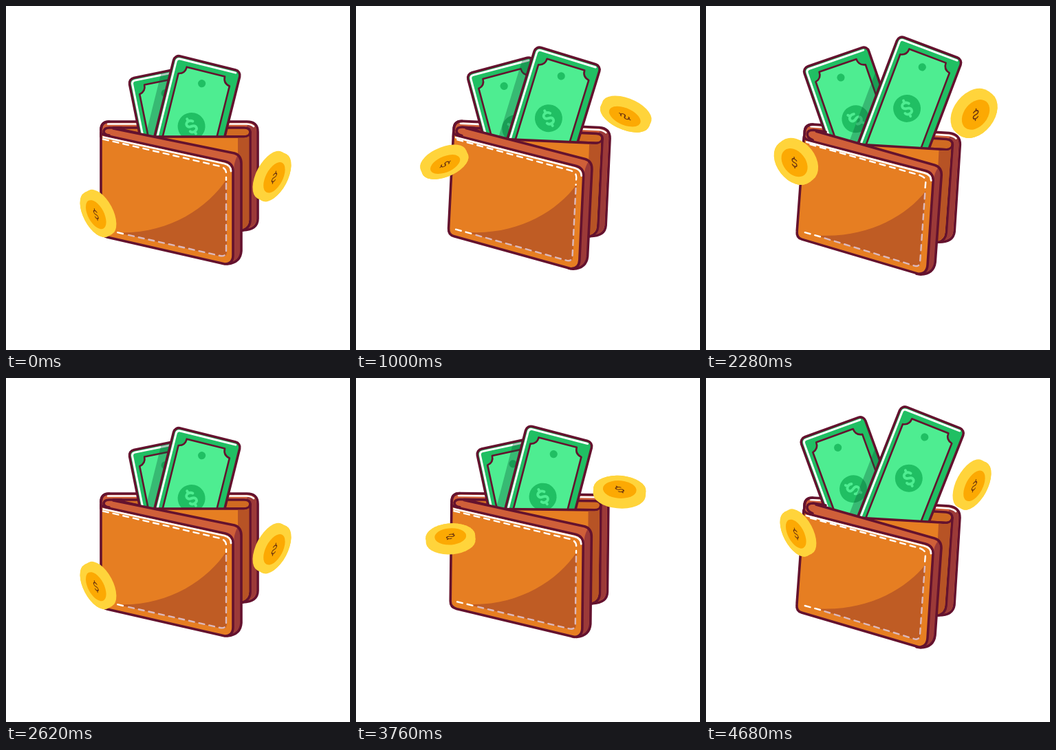
An HTML page that plays this animation: 500 by 500 pixels, repeating every 4800 ms.

```html
<!DOCTYPE html>
<html lang="en">
<head>
<meta charset="utf-8">
<title>Wallet</title>
<style>
html, body { margin: 0; width: 100%; height: 100%; overflow: hidden; background: #fff; }
svg { display: block; width: 100vw; height: 100vh; }
.ink { stroke: #64122e; stroke-width: 3.6; stroke-linejoin: round; stroke-linecap: round; }
.line { fill: none; stroke-linecap: round; }
</style>
</head>
<body>
<svg viewBox="0 0 500 500">
  <defs>
    <path id="dollar" d="M5 -5 Q3 -8 0 -8 C-6.5 -8 -6.5 -1 0 0 C6.5 1 6.5 8 0 8 Q-4 8 -5 5 M0 -11.5 V-8 M0 8 V11.5" fill="none" stroke-linecap="round"/>
    <g id="bill">
      <rect width="99" height="190" rx="8" fill="#20bf63"/>
      <path d="M4 188 V9 Q4 4 9 4 H92" class="line" stroke="#fff" stroke-width="3"/>
      <path class="ink" fill="#4eed91" style="stroke-width:2.6" d="M11.5 188 V25 Q21 23 21 13 H78 Q78 23 88 25 V188"/>
      <circle cx="48" cy="31" r="5.6" fill="#20bf63"/>
      <circle cx="48.5" cy="95" r="20" fill="#20bf63"/>
      <use href="#dollar" transform="translate(48.5 95) rotate(-45) scale(1.08)" stroke="#4eed91" stroke-width="3.6"/>
      <rect class="ink" width="99" height="190" rx="8" fill="none"/>
    </g>
    <clipPath id="backClip"><rect id="backArea" x="1.5" y="1.5" width="96" height="188" rx="7"/></clipPath>
  </defs>
  <g id="behind"></g>
  <use id="backBill" href="#bill"/>
  <g clip-path="url(#backClip)"><rect id="shadow" x="-13" width="14" height="190" fill="#0c5a3a" opacity=".34"/></g>
  <use id="frontBill" href="#bill"/>
  <g id="cover"></g>
  <g id="coins"></g>
</svg>
<script>
const NS = 'http://www.w3.org/2000/svg';
const LOOP = 4800, STARTS = [140, 880, 1520, 2220, 2860, 3600, 4260];
const $ = id => document.getElementById(id);
const lerp = (a, b, p) => a + (b - a) * p;

function add(parent, tag, attrs) {
  const el = document.createElementNS(NS, tag);
  for (const k in attrs) el.setAttribute(k, attrs[k]);
  parent.appendChild(el);
  return el;
}

// Each part: layer, attributes, path when closed, path when open.
const fill = c => ({ fill: c });
const inked = c => ({ fill: c, class: 'ink' });
const line = (c, w, dash) => ({ class: 'line', stroke: c, 'stroke-width': w, 'stroke-dasharray': dash || 'none' });
const RIM = '#cf5f39', RED = '#9c3a38', ORANGE = '#e67e22', SHADE = '#bf5c24';
const parts = [
  ['behind', inked(RIM),
    'M139 186 L138 180 Q138 168 150 168 L350 168 Q366 168 366 183 L366 309 Q366 325 344 326 L300 320 L180 200Z',
    'M143 192 L143 186 Q143 174 155 174 L353 186 Q369 188 369 203 L361 330 Q359 345 338 345 L300 340 L180 214Z'],
  ['behind', fill(RED),
    'M352 171 Q364 172 364 183 L364 309 Q364 320 349 324 Q355 320 355 311 L355 183 Q355 178 349 177Z',
    'M355 189 Q367 191 367 203 L359 330 Q357 341 343 343 Q349 340 349 331 L358 203 Q358 197 352 195Z'],
  ['behind', line('#fff', 2.6),
    'M148 171.5 L350 171.5 Q357 172 360 175', 'M152 177 L353 189.5 Q360 191 363 194'],
  ['behind', inked('#d06a22'),
    'M156 177 L346 177 Q355 177 355 183.5 Q355 190 346 190 L215 190Z',
    'M160 184 L349 195 Q358 196 358 203 Q357 211 349 210.5 L228 203.5Z'],
  ['cover', inked(ORANGE),
    'M215 190 L346 190 Q355 190 355 183 L355 311 Q355 322 344 326 L300 320 L215 240Z',
    'M228 203.5 L349 210.5 Q358 210 358 203 L349 331 Q348 342 338 345 L300 340 L228 250Z'],
  ['cover', fill('#b75325'),
    'M337 191.7 L346 191.7 Q351 191 353.3 189 L353.3 311 Q353 321 344 324 L337 322Z',
    'M338 211.7 L349 212.2 Q354 212 356 209 L347.3 331 Q346 340 338 343 L332 342Z'],
  ['cover', fill(RIM),
    'M138 187 L139 183 Q140 176 150 176 L156 177 L332 214 Q342 217 342 229 L342 356 Q341 373 322 375 L147 336 Q138 334 138 325Z',
    'M142 196 L144 190 Q145 181 155 181 L160 184 L332 233 Q342 236 342 247 L333 374 Q331 391 312 392 L139 341 Q131 339 132 329Z'],
  ['cover', fill(RED),
    'M331 240 Q331 228 336 218 Q342 222 342 229 L342 356 Q341 373 322 375 Q331 372 331 362Z',
    'M331 253 Q331 245 337 237 Q342 241 342 247 L333 374 Q331 391 312 392 Q322 388 322 380Z'],
  ['cover', { class: 'ink', fill: 'none' },
    'M150 188 Q142 187 142 182 Q143 177 150 177 L168 177 M156 178 L332 214 Q342 217 342 229 L342 356 Q341 373 322 375 L315 374',
    'M155 197 Q146 193 147 187 Q148 182 156 182 L174 185 M160 184 L332 233 Q342 236 342 247 L333 374 Q331 391 312 392 L306 391'],
  ['cover', { class: 'ink', fill: 'none' },
    'M138 190 L138 180 Q138 168 150 168', 'M142 199 L143 186 Q143 174 155 174'],
  ['cover', inked(ORANGE),
    'M138 184 Q140 187 146 188.5 L319 226 Q330 229 330 240 L330 362 Q330 375 318 375 L147 336 Q138 334 138 325Z',
    'M142 192 Q144 196 150 198 L319 241 Q330 244 330 255 L322 378 Q321 391 309 391 L139 341 Q131 339 132 329Z'],
  ['cover', line('#fff', 2.8),
    'M141.5 190.5 L317 229 Q327 231.5 327 240', 'M146 200 L317 244 Q327 246.5 327 255'],
  ['cover', fill(SHADE),
    'M160 329 C232 333 292 296 321 251 L321 357 Q321 366 312 364Z',
    'M160 335 C232 340 290 308 319 271 L311 375 Q311 383 302 380Z'],
  ['cover', line('#fff', 2.4, '8 7'),
    'M141 193.5 L311 233 Q320 235.5 320 243 L320 253', 'M152 203.5 L311 247.5 Q319 250 319 257 L318 269'],
  ['cover', line('#dcb9bd', 2.4, '8 7'),
    'M320 258 L320 356 Q320 365 311 363 L172 331.5', 'M318 274 L311 373 Q310 382 302 379 L172 339'],
  ['cover', line('#fff', 2.4, '8 7'),
    'M170 331 L144 325', 'M166 337 L140 330']
].map(([layer, attrs, a, b]) => ({ el: add($(layer), 'path', attrs), a, b: b.match(/[\d.]+/g).map(Number) }));

function mixPath(a, b, p) {
  let i = 0;
  return a.replace(/[\d.]+/g, n => lerp(+n, b[i++], p).toFixed(2));
}

function track(t, keys) {
  for (let i = 1; i < keys.length; i++) {
    const [t0, v0] = keys[i - 1], [t1, v1] = keys[i];
    if (t < t1) return lerp(v0, v1, Math.max(0, (t - t0) / (t1 - t0)));
  }
  return keys[keys.length - 1][1];
}

// Small vector helpers for the tumbling coins
const dot = (a, b) => a[0] * b[0] + a[1] * b[1] + a[2] * b[2];
const cross = (a, b) => [a[1] * b[2] - a[2] * b[1], a[2] * b[0] - a[0] * b[2], a[0] * b[1] - a[1] * b[0]];
const unit = a => a.map(x => x / Math.hypot(...a));
function turn(v, k, ang) {
  const c = Math.cos(ang), s = Math.sin(ang), w = cross(k, v), d = dot(k, v) * (1 - c);
  return v.map((x, i) => x * c + w[i] * s + k[i] * d);
}
const REST = unit([-.76, .4, .5]);
const TILT = [-.2, 1, 0];
const DOWN = unit(TILT.map((x, i) => x - REST[i] * dot(REST, TILT)));
const SIDE = cross(DOWN, REST);

// Motion of both directions: wallet, coin travel, coin spin, coin sway
const OPEN = {
  wallet: [[0, 0], [40, .06], [80, .36], [100, .58], [120, .8], [140, .93], [200, .985], [380, 1]],
  move: [[0, 0], [60, .2], [100, .58], [140, .88], [200, .97], [380, 1]],
  spin: [[0, 0], [60, .2], [100, .55], [140, .83], [220, .95], [390, 1]],
  sway: [[0, 0], [140, 4], [380, 0]],
  axis: unit(cross(REST, [-.91, -.42, 0])), dir: -1
};
const CLOSE = {
  wallet: [[0, 0], [60, .1], [100, .38], [120, .58], [140, .8], [160, .92], [220, .985], [380, 1]],
  move: [[0, 0], [120, .02], [160, .11], [220, .5], [280, .85], [390, 1]],
  spin: [[0, 0], [60, .06], [120, .3], [160, .57], [220, .85], [300, .97], [390, 1]],
  sway: [[0, 0], [120, -6], [160, 3.5], [390, 0]],
  axis: unit([-.33, .93, .14]), dir: 1
};

const R = 36, HALF = 4.2;
function makeCoin(x, yClosed, yOpen, scale, flip) {
  const g = add($('coins'), 'g', {});
  const gold = fill('#ffd43b');
  const faces = [-1, 1].map(side => ({ side, el: add(g, 'circle', { r: R, ...gold }) }));
  const band = add(g, 'path', gold);
  const ribs = add(g, 'path', { stroke: '#f59f00', 'stroke-width': HALF * 2, 'stroke-dasharray': '1 1.2' });
  const top = add(g, 'g', {});
  add(top, 'circle', { r: R, ...gold });
  add(top, 'circle', { r: 23, fill: '#fca903' });
  add(top, 'use', { href: '#dollar', transform: 'scale(.8)', stroke: '#6b3410', 'stroke-width': 2.2 });
  return { x, yClosed, yOpen, scale, flip, g, faces, band, ribs, top };
}
const coins = [makeCoin(134, 301.5, 225, 1, 1), makeCoin(386.5, 247.5, 155, 1.06, -1)];

function drawCoin(c, pos, spin, sway, m) {
  const ang = m.dir * spin * Math.PI * 2;
  const n = turn(REST, m.axis, ang), u = turn(SIDE, m.axis, ang), v = turn(DOWN, m.axis, ang);
  const place = k => `matrix(${[u[0], u[1], v[0], v[1], n[0] * HALF * k, n[1] * HALF * k].map(q => q.toFixed(4))})`;
  c.g.setAttribute('transform',
    `translate(${c.x + sway * c.flip} ${lerp(c.yClosed, c.yOpen, pos)}) scale(${c.scale * c.flip} ${c.scale})`);
  c.faces.forEach(f => f.el.setAttribute('transform', place(f.side)));
  c.top.setAttribute('transform', place(n[2] < 0 ? -1 : 1));
  const len = Math.hypot(n[0], n[1]) || 1;
  const ax = -n[1] / len * R, ay = n[0] / len * R, hx = n[0] * HALF, hy = n[1] * HALF;
  c.band.setAttribute('d', `M${ax + hx} ${ay + hy} L${ax - hx} ${ay - hy} L${-ax - hx} ${-ay - hy} L${-ax + hx} ${-ay + hy}Z`);
  c.ribs.setAttribute('d', `M${ax} ${ay} L${-ax} ${-ay}`);
  c.ribs.setAttribute('opacity', Math.max(0, 1 - Math.abs(n[2]) * 8));
  c.top.setAttribute('opacity', Math.abs(n[2]) < .04 ? 0 : 1);
}

function pose(ids, x, y, deg) {
  ids.forEach(id => $(id).setAttribute('transform', `translate(${x} ${y}) rotate(${deg})`));
}

function render(t) {
  let i = -1;
  while (i + 1 < STARTS.length && STARTS[i + 1] <= t) i++;
  const opening = i % 2 === 0;
  const m = opening ? OPEN : CLOSE;
  const dt = i < 0 ? 400 : t - STARTS[i];
  const toward = q => opening ? q : 1 - q;
  const p = toward(track(dt, m.wallet));

  parts.forEach(s => s.el.setAttribute('d', mixPath(s.a, s.b, p)));
  // The wallet leans a little halfway through
  const lean = 1.25 * 4 * p * (1 - p);
  ['behind', 'cover'].forEach(id => $(id).setAttribute('transform', `rotate(${lean} 300 280)`));
  pose(['backBill', 'backArea'], lerp(178, 136, p), lerp(106, 88.5, p), lerp(-11.5, -20, p));
  pose(['frontBill', 'shadow'], lerp(245.5, 284.5, p), lerp(71, 39.5, p), lerp(14, 21.5, p));

  const pos = toward(track(dt, m.move)), spin = track(dt, m.spin), sway = track(dt, m.sway);
  coins.forEach(c => drawCoin(c, pos, spin, sway, m));
}

const t0 = performance.now();
function tick() {
  render((performance.now() - t0) % LOOP);
  requestAnimationFrame(tick);
}
tick();
</script>
</body>
</html>
```
